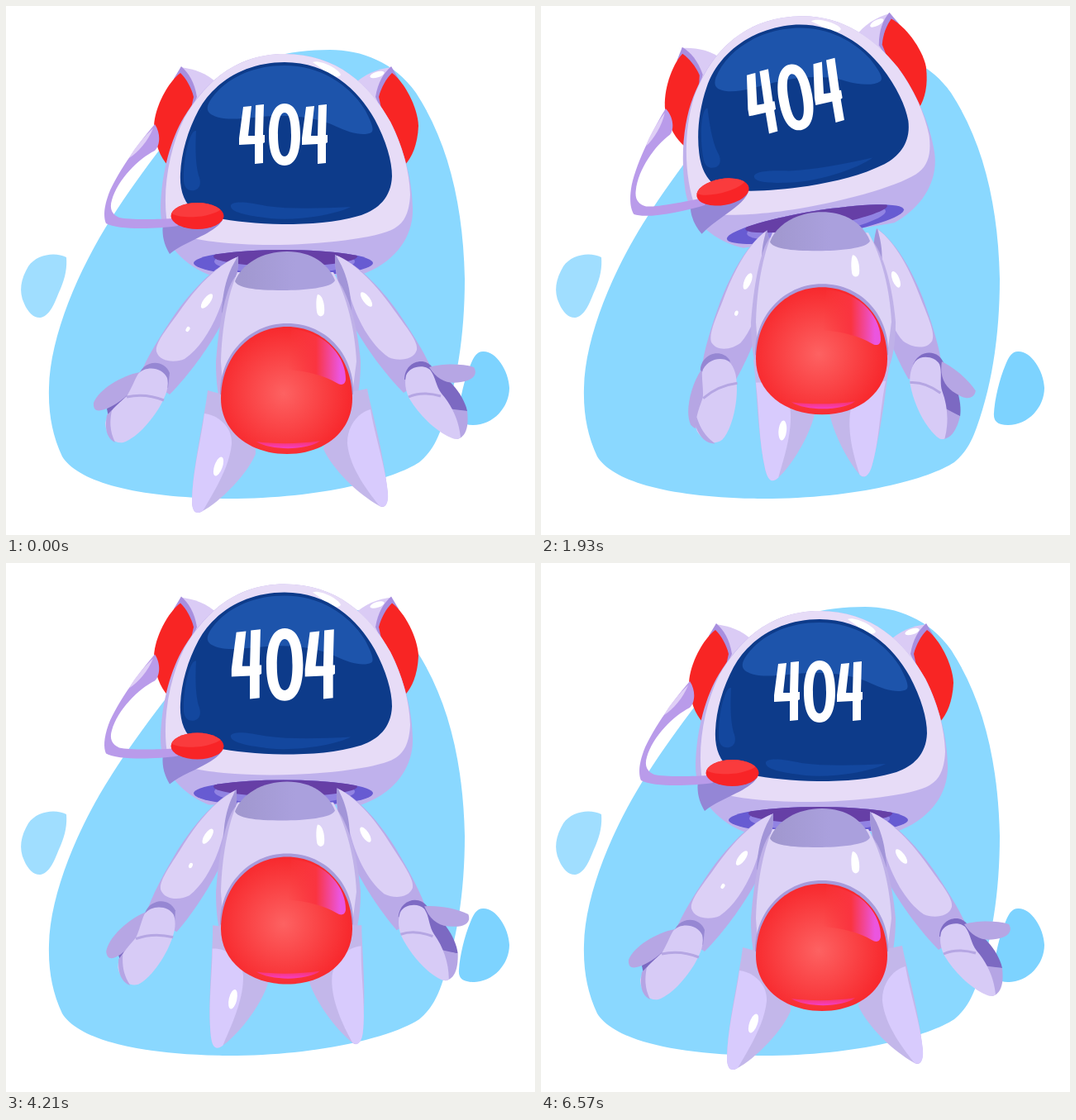
Animation, 640 px wide and 640 px high, one loop 7.21 s. Source, as an HTML page:

```html
<!DOCTYPE html>
<html lang="en">
<head>
<meta charset="utf-8">
<title>404 robot</title>
<style>
html, body { margin: 0; width: 100%; height: 100%; overflow: hidden; background: #fff; }
svg { display: block; width: 100%; height: 100%; }
</style>
</head>
<body>
<svg viewBox="0 0 640 640" role="img" aria-label="404">
  <defs>
    <radialGradient id="ball" gradientUnits="userSpaceOnUse" cx="336" cy="469" r="88">
      <stop offset="0" stop-color="#fd6262"/>
      <stop offset="1" stop-color="#f72429"/>
    </radialGradient>
    <linearGradient id="pink" gradientUnits="userSpaceOnUse" x1="340" y1="0" x2="404" y2="0">
      <stop offset="0" stop-color="#fa3a3e" stop-opacity="0"/>
      <stop offset=".55" stop-color="#fa3440"/>
      <stop offset="1" stop-color="#eb55df"/>
    </linearGradient>
    <linearGradient id="glow" gradientUnits="userSpaceOnUse" x1="0" y1="526" x2="0" y2="535">
      <stop offset="0" stop-color="#f535a0" stop-opacity=".5"/>
      <stop offset="1" stop-color="#f53fc4"/>
    </linearGradient>
    <linearGradient id="collar" gradientUnits="userSpaceOnUse" x1="277" y1="0" x2="398" y2="0">
      <stop offset="0" stop-color="#a097ce"/>
      <stop offset=".6" stop-color="#aaa0dd"/>
    </linearGradient>
    <clipPath id="hole"><ellipse cx="335.500" cy="311" rx="108.500" ry="16"/></clipPath>
    <clipPath id="mic"><ellipse cx="231.500" cy="254" rx="32" ry="16"/></clipPath>
    <path id="four" d="M287 122L297 121L293 157L301 157L302 120L312 119L311 156L313 156L313 165L311 166L311 190L301 191L301 167L282 168L282 160Z"/>
    <g id="ear">
      <path fill="#dacbf5" d="M211 74C228 76 245 82 258 96L225 125Z"/>
      <path fill="#a88fdf" d="M212 73L203 88L222 130L231 110C228 92 221 81 212 73Z"/>
      <path fill="#f82524" d="M211 81C196 92 180 122 179 145C180 168 187 183 195 192L216 160L227 110C224 98 218 88 211 81Z"/>
    </g>
    <g id="upper">
      <path fill="#baaae8" d="M281 303C255 313 228 340 205 372C188 397 170 425 162 447L198 470C218 450 245 415 262 382C275 355 281 330 281 303Z"/>
      <path fill="#dcd0f6" d="M279 304C255 314 230 340 208 372C195 390 180 408 182 418C186 431 205 432 216 427C238 412 255 380 263 352C268 335 272 320 279 304Z"/>
      <path fill="#a295d8" d="M281 303C270 318 262 340 261 372C272 355 282 325 281 303Z"/>
      <ellipse fill="#fff" cx="243" cy="357" rx="4.200" ry="10.500" transform="rotate(37 243 357)"/>
    </g>
  </defs>

  <path fill="#8ad8ff" d="M392 53C430 53 470 68 496 105C535 165 553 240 555 330C555 400 545 460 527 510C520 530 512 542 500 552C470 572 380 597 262 596C150 594 86 574 68 545C57 522 51 495 52 462C53 400 88 318 128 256C165 198 212 140 250 92C290 66 340 53 392 53Z"/>
  <path fill="#a0deff" d="M73 304C60 297 37 300 27 315C18 330 15 345 22 360C27 372 35 378 42 377C55 374 60 355 66 342C72 328 74 316 73 304Z"/>
  <path fill="#7dd3ff" d="M577 418C592 417 608 440 609 462C609 485 590 507 565 507C552 507 547 502 548 492C549 475 555 450 562 434C566 424 570 418 577 418Z"/>

  <g id="robot">
    <g id="head">
      <use href="#ear"/>
      <use href="#ear" transform="translate(678 0) scale(-1 1)"/>
      <ellipse fill="#fff" cx="449" cy="83" rx="9" ry="3.500" transform="rotate(-18 449 83)"/>

      <!-- shell -->
      <path fill="#bfb1ec" d="M337 58C400 58 440 95 465 140C482 172 492 215 492 245C493 278 472 310 430 325L245 325C205 308 187 278 187 245C188 200 200 160 215 135C245 85 285 58 337 58Z"/>
      <path fill="#e7dcf7" d="M337 58C400 58 440 95 465 140C480 170 488 200 489 228C488 250 482 262 470 269C450 281 380 289 320 289C280 289 240 285 222 280L196 268C188 230 196 175 216 135C245 85 285 58 337 58Z"/>
      <path fill="#9486d6" d="M190 264L262 259C252 276 218 284 198 300C192 290 188 278 190 264Z"/>
      <path fill="#fff" d="M371 68C378 64 402 75 405 83C402 89 390 84 381 75Z"/>

      <!-- screen -->
      <path fill="#0d3b8a" d="M337 68C390 68 426 101 446 137C460 163 467 188 467 206C466 232 450 246 430 253C400 262 370 264 335 264C290 263 250 258 230 249C215 240 210 222 211 203C212 178 220 150 233 126C251 92 290 68 337 68Z"/>
      <path fill="#1d54ab" d="M337 72C380 72 415 95 434 125C442 140 446 150 442 153C432 158 415 153 400 146C380 136 350 132 325 133C300 134 275 139 258 135C244 131 241 126 246 116C262 90 295 72 337 72Z"/>
      <path fill="#13479e" d="M229 151C222 152 214 185 215 212C216 222 222 224 228 223C236 221 236 212 233 205C229 190 229 170 230 151ZM272 241C276 235 295 238 315 242C345 246 380 245 417 243C400 252 355 260 320 257C295 254 270 250 272 241Z"/>
      <g id="code" fill="#fff">
        <use href="#four"/>
        <path fill-rule="evenodd" d="M337 118C351 118 356 135 356 156C356 178 350 193 337 193C324 193 318 178 318 156C318 135 324 118 337 118ZM337 129C331 129 329 142 329 156C329 170 331 182 337 182C343 182 345 170 345 156C345 142 343 129 337 129Z"/>
        <use href="#four" x="76"/>
      </g>

      <!-- underside -->
      <g clip-path="url(#hole)">
        <rect fill="#675bd2" x="220" y="290" width="230" height="40"/>
        <ellipse fill="#9183e3" cx="337" cy="309" rx="85" ry="15"/>
        <ellipse fill="#663fa6" cx="338" cy="303" rx="87" ry="12"/>
      </g>

      <!-- microphone -->
      <path fill="#b99bea" d="M180 143C165 160 135 200 124 228C118 245 118 256 121 263C135 271 180 270 208 266L206 257C185 258 150 259 137 256C128 252 125 245 128 235C135 210 160 185 180 175C186 170 188 155 180 143Z"/>
      <path fill="#dfcff6" d="M178 148C168 157 155 172 149 184C160 177 172 163 178 148Z"/>
      <g clip-path="url(#mic)">
        <rect fill="#f82427" x="198" y="236" width="68" height="36"/>
        <ellipse fill="#fa3b3d" cx="229" cy="243" rx="34" ry="12" transform="rotate(-4 229 243)"/>
      </g>
    </g>

    <g id="armL">
      <use href="#upper"/>
      <ellipse fill="#fff" cx="220" cy="391" rx="2.200" ry="3.300" transform="rotate(30 220 391)"/>
      <path fill="#9687d3" d="M160 450C162 430 190 424 198 444L196 462Z"/>
      <g id="handL">
        <path fill="#7c69c2" d="M122 487C135 480 146 468 156 452L150 474C140 480 130 488 124 497Z"/>
        <path id="thumbL" fill="#b6a6e4" d="M162 443C140 447 112 464 106 480C105 491 112 491 122 487C138 480 152 468 160 455Z"/>
        <path fill="#d7cbf6" d="M160 445C170 434 190 438 195 450C197 458 195 468 190 477C182 495 160 522 142 528C130 530 121 520 120 505C121 493 135 482 146 472C152 463 155 453 160 445Z"/>
        <path fill="#b5a5e4" d="M122 495C119 512 122 523 132 528C126 515 125 505 128 489Z"/>
        <path fill="none" stroke="#b5a6e3" stroke-width="3" d="M146 473C160 470 176 471 191 477"/>
      </g>
    </g>

    <g id="armR">
      <use href="#upper" transform="translate(679 -2) scale(-1 1)"/>
      <path fill="#7e6bc4" d="M482 452C482 430 508 422 518 440L512 455Z"/>
      <g id="handR">
        <path fill="#7c69c2" d="M512 438C532 445 553 468 558 490L536 489L518 455Z"/>
        <path id="thumbR" fill="#b6a6e4" d="M512 437C525 433 550 432 566 437C571 445 566 453 550 455C535 458 522 453 512 437Z"/>
        <path fill="#b5a5e4" d="M534 487L558 490C560 508 557 521 546 524Z"/>
        <path fill="#d7cbf6" d="M484 447C488 436 505 433 513 440C520 449 520 460 527 469C540 484 548 502 550 522C547 525 543 524 540 523C520 515 500 495 488 475C483 465 482 455 484 447Z"/>
        <path fill="none" stroke="#b5a6e3" stroke-width="3" d="M487 473C498 468 512 468 526 472"/>
      </g>
    </g>

    <!-- torso -->
    <path fill="#bfb1e8" d="M277 328C264 345 257 390 254 430C254 460 257 490 275 510L405 510C425 490 429 460 429 430C425 385 414 345 398 328Z"/>
    <path fill="#ddd3f6" d="M280 322C268 350 261 390 260 430L265 500L415 500L424 430C422 390 412 350 396 322Z"/>
    <path fill="url(#collar)" d="M277 333C285 312 310 297 340 297C370 297 390 312 398 332C395 341 360 344 335 344C300 344 280 341 277 333Z"/>
    <path fill="#fff" d="M377 349C383 349 386 362 385 371C384 377 377 377 376 370C375 362 375 354 377 349Z"/>

    <g id="legL">
      <path fill="#c3b7ea" d="M244 465C240 500 226 555 225 598C225 610 229 615 236 612C255 603 290 570 302 542L300 480Z"/>
      <path fill="#d8cbfd" d="M240 493C258 495 274 510 273 530C270 560 250 590 238 611C229 616 225 612 225 598C226 560 236 525 240 493Z"/>
      <ellipse fill="#fff" cx="257" cy="557" rx="4.800" ry="12" transform="rotate(20 257 557)"/>
    </g>
    <g id="legR">
      <path fill="#c3b7ea" d="M437 463C442 490 455 530 462 590C462 604 458 608 452 605C425 590 395 560 384 536L400 470L427 465Z"/>
      <path fill="#d8cbfd" d="M441 488C425 492 412 510 413 530C416 560 440 590 452 605C459 608 463 602 462 590C460 560 446 520 441 488Z"/>
    </g>

    <!-- belly -->
    <path fill="#a79bdb" d="M340 384C390 384 422 425 420 470L259 470C258 425 292 384 340 384Z"/>
    <path fill="url(#ball)" d="M340 388C385 388 419 425 419 475C419 515 385 542 340 542C295 542 260 515 260 475C260 425 295 388 340 388Z"/>
    <path fill="url(#pink)" d="M345 391C390 394 412 428 411 452C410 459 405 459 400 456C385 447 365 442 342 440Z"/>
    <path fill="url(#glow)" d="M303 527C325 530 355 530 380 526C365 538 320 538 303 527Z"/>
  </g>
</svg>
<script>
const LOOP = 7210, STEP = 1000 / 14, END = 92 * STEP;
const el = id => document.getElementById(id);
const clamp = x => Math.min(1, Math.max(0, x));

// Eases out from 0 to 1 at `top`, then eases away to 0 at `end`.
function swell(t, top, end, up, down) {
  return t < top
    ? 1 - (1 - clamp(t / top)) ** up
    : 1 - clamp((t - top) / (end - top)) ** down;
}

function turn(id, angle, x, y) {
  el(id).setAttribute('transform', `rotate(${angle.toFixed(3)} ${x} ${y})`);
}

function draw(ms) {
  // 14 poses a second, then a rest until the loop restarts
  const t = Math.min(END, Math.floor((ms % LOOP + 5) / STEP) * STEP);
  const half = END / 2;
  const lift = 50 * swell(t, 2100, END, 1.25, 1.4);
  const tilt = 9.5 * swell(t, 1900, 4200, 2, 1.45);
  const arm = 15.7 * swell(t, 1650, 4950, 1.5, 1.05);
  const leg = 14.6 * swell(t, 2100, 5900, 1.6, 1.15);
  const beat = t < half ? swell(t, 950, 2450, 1.5, 1.35) : swell(t - half, 950, half, 1.5, 1.35);

  el('robot').setAttribute('transform', `translate(0 ${(-lift).toFixed(3)})`);
  el('code').setAttribute('transform', `translate(336 156) scale(${1 + 0.17 * beat}) translate(-336 -156)`);
  turn('head', -tilt, 339, 333);
  turn('legL', -leg, 292, 419);
  turn('legR', leg * 1.46, 392, 430);
  turn('armL', -arm, 340, 341);
  turn('handL', -arm, 180, 440);
  turn('thumbL', -arm * 1.15, 158, 449);
  turn('armR', arm, 340, 341);
  turn('handR', arm * 0.4, 500, 440);
  turn('thumbR', arm * 1.4, 516, 443);
}

const start = performance.now();
function tick() {
  draw(performance.now() - start);
  requestAnimationFrame(tick);
}
draw(0);
requestAnimationFrame(tick);
</script>
</body>
</html>
```
